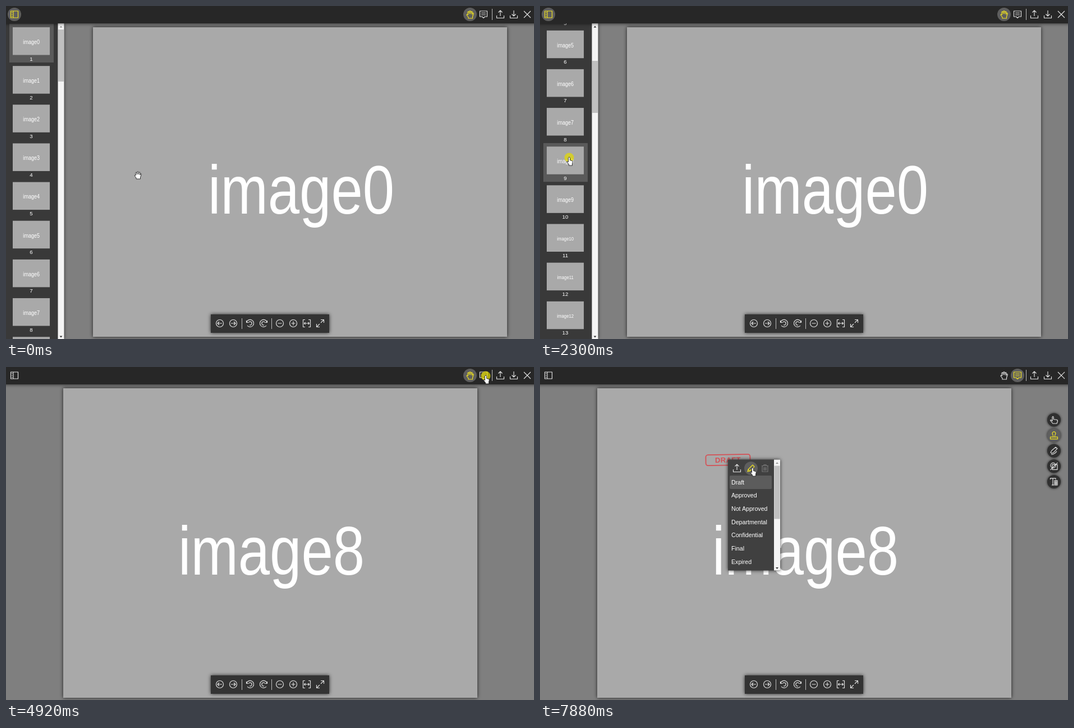
Write an HTML page that moves like this. It is 941x595 px and loops after 8 s.

```html
<!DOCTYPE html>
<html lang="en">
<head>
<meta charset="utf-8">
<title>Document viewer</title>
<style>
  html, body { margin: 0; height: 100%; overflow: hidden; background: #7f7f7f; }
  svg { display: block; width: 941px; height: 595px; font-family: "Liberation Sans", Arial, sans-serif; }
  text { fill: #fff; }
  .shadow { filter: drop-shadow(0 0 3px rgba(0, 0, 0, .75)); }
  .mid { text-anchor: middle; }
  .icon path { fill: none; stroke: #e2e2e2; stroke-width: 1.15; stroke-linejoin: round; }
  .icon circle { fill: none; }
  .tool circle { fill: #303030; filter: drop-shadow(0 0 2px rgba(0, 0, 0, .7)); }
  .icon.hot circle, .icon.on circle { fill: #5e5e5e; }
  .icon.on path { stroke: #f2e420; }
  .dim { opacity: .35; }
  .cell { fill: none; }
  .cell.lit { fill: #5a5a5a; }
  .cursor { fill: #fff; stroke: #222; stroke-width: .9; stroke-linejoin: round; }
  .hidden { display: none; }
</style>
</head>
<body>
<svg id="stage" viewBox="0 0 941 595"></svg>
<script>
const LOOP = 8000, PITCH = 69.15, CELLS = 14;

const HAND = 'M-3 7V5L-6 1Q-5.6-1-3.5.5L-4.2-4Q-3-6-1.9-4.2L-1.3-1-1-5.7Q.2-7 1.2-5.5L1.4-1 2.2-4.8Q3.5-6 4.2-4.3L3.8 0 4.8-2.4Q6.3-2.8 6.2-1L4.5 4V7Z';
const RING = 'M6.5 0A6.5 6.5 0 1 1-6.5 0A6.5 6.5 0 1 1 6.5 0';
const ICONS = {
  panel: 'M-6.5-6H6.5V6H-6.5ZM-2-6V6M-5-3.5H-3.5M-5 0H-3.5M-5 3.5H-3.5',
  hand: HAND,
  comment: 'M-6.5-6H6.5V4H2.5L0 6.5-2.5 4H-6.5ZM-4-2.5H4M-4 .7H4',
  upload: 'M-6.5 2V6.5H6.5V2M0 3V-7M-3.5-3.5L0-7 3.5-3.5',
  download: 'M-6.5 2V6.5H6.5V2M0 3V-7M-3.5-.5L0 3 3.5-.5',
  close: 'M-6-6L6 6M6-6L-6 6',
  prev: RING + 'M4 0H-4M-1-3L-4 0-1 3',
  next: RING + 'M-4 0H4M1-3L4 0 1 3',
  ccw: 'M-6.2-2A6.5 6.5 0 1 1-5 4M-6.5-5V-1.5H-3M-2.5-1.5A3 3 0 1 1-1 2.8',
  cw: 'M6.2-2A6.5 6.5 0 1 0 5 4M6.5-5V-1.5H3M2.5-1.5A3 3 0 1 0 1 2.8',
  minus: RING + 'M-3.5 0H3.5',
  plus: RING + 'M-3.5 0H3.5M0-3.5V3.5',
  fit: 'M-3-6.5H-6.5V6.5H-3M3-6.5H6.5V6.5H3M-4.5 0H4.5M-2.5-2L-4.5 0-2.5 2M2.5-2L4.5 0 2.5 2',
  expand: 'M1-6.5H6.5V-1M6.5-6.5L1-1M-1 6.5H-6.5V1M-6.5 6.5L-1 1',
  point: 'M-3 2.5V-5Q-1.8-7.5-.8-5V-1L5-.2Q7 .5 6.3 3L5 6.5H-2L-6.5 1Q-5.8-1-3 2',
  stamp: 'M-6.5 3H6.5V6.5H-6.5ZM-1.8 3Q-1 0-2.5-2A2.9 2.9 0 1 1 2.5-2Q1 0 1.8 3',
  marker: 'M-6 3L-4-.5 3-6.5 6-4-.5 3-4.5 4.5ZM-5 6.5Q1 6.5 5 1',
  shape: 'M3-1.5A4.5 4.5 0 1 1-1.5-6A4.5 4.5 0 0 1 3-1.5M-3-3H6V6H-3ZM-6.5 6.5L6.5-6.5',
  type: 'M-6.5-4V-6H3V-4M-2-6V6M-4 6H0M1-2H6V6H1ZM1 1H6M1 3.5H6M3.5-2V6',
  pencil: 'M-6 6L-5 2 3-6 6-3-2 5ZM-5 2L-2 5',
  trash: 'M-6-4.5H6M-2-4.5V-6.5H2V-4.5M-5-4.5V6H5V-4.5M-2-2V4M0-2V4M2-2V4'
};
const CURSORS = {
  grab: HAND,
  pointer: 'M-1.5.3C-1.2-1.3 1.2-1.3 1.5.3V4.5L5.3 5.6Q6.4 6 6.2 7.5L5.5 11V14H-.5V12L-3.8 8Q-4.3 6.5-3 6.5L-1.5 8Z',
  arrow: 'M0 0V13L3 10.3 5 15 7 14.2 5 9.6H9Z'
};

// Bursts of activity: start, end, number of updates
const BURSTS = [[100, 190, 2], [560, 1300, 9], [1500, 2120, 8], [2300, 3070, 9], [3150, 3160, 2],
  [3450, 4180, 9], [4280, 5020, 9], [5220, 5940, 9], [6120, 6780, 8], [6960, 7040, 2],
  [7420, 7520, 2], [7700, 7880, 3]];
const PATH = [[0, 235, 302], [100, 138, 118], [190, 100, -40], [560, 82, 6], [1115, 75, 102], [1300, 55, 224],
  [1500, 52, 260], [1588, 52, 271], [2396, 52, 271], [3070, 22, 15], [3160, 21, 14], [4000, 21, 14],
  [4180, 775, 109], [4280, 787, 92], [4650, 855, 16], [5020, 855, 16], [5220, 862, 28], [5940, 916, 125],
  [6214, 916, 125], [6308, 900, 128], [6780, 335, 165], [7040, 335, 165], [7420, 352, 185],
  [7520, 371, 201], [7700, 373, 195], [7880, 379, 181]];
const MODES = [[0, 'grab'], [560, 'arrow'], [700, 'pointer'], [4080, 'grab'], [4550, 'pointer'],
  [5220, 'arrow'], [5800, 'pointer'], [6300, 'arrow'], [7420, 'pointer']];
const SCROLL = [[1499, 0], [1500, 30], [2120, 340], [2300, 340], [2396, 305]];
const SLIDE = [[3541, 0], [3815, 83.5], [3906, 112]];
const CLICKS = [[2300, 2390], [3450, 3540], [4830, 4920], [6120, 6210], [6960, 7030]];

const icon = (name, x, y, cls = '', r = 12) =>
  `<g id="${name}" class="icon ${cls}" transform="translate(${x} ${y})"><circle r="${r}"/><path d="${ICONS[name]}"/></g>`;
const rect = (x, y, w, h, fill, extra = '') =>
  `<rect x="${x}" y="${y}" width="${w}" height="${h}" fill="${fill}" ${extra}/>`;
const rule = (x, y, h) => rect(x, y, 1, h, '#bbb');
const each = (list, make) => list.map(make).join('');

// Page artwork: the label always fills the same width
const page = label => rect(0, 0, 738, 553, '#a9a9a9') +
  `<text class="mid" transform="translate(371 ${289 + 264 / label.length}) scale(.83 1)" font-size="${732 / label.length}">${label}</text>`;

const scrollbar = (id, x, y, h, thumb) => rect(x, y, 11, h, '#f4f4f4') +
  rect(x + .5, y + 11, 10, thumb, '#c0c0c0', `id="${id}Thumb"`) +
  `<path id="${id}Up" fill="#999" d="M${x + 3} ${y + 7.5}h5l-2.5-3z"/>` +
  `<path fill="#333" d="M${x + 3} ${y + h - 5.5}h5l-2.5 3z"/>`;

const cell = i => `<g transform="translate(0 ${38 + i * PITCH})">
  <rect class="cell" x="6" y="-6.2" width="79" height="${PITCH}"/>
  <g transform="translate(12 0) scale(.0895)">${page('image' + i)}</g>
  <text class="mid" x="45" y="59.5" font-size="9.7">${i + 1}</text></g>`;

const menuItem = (label, i) => `<text x="341" y="${209.5 + i * 23.7}" font-size="10.65">${label}</text>`;

const stage = document.getElementById('stage');
stage.innerHTML = rect(0, 0, 941, 595, '#7f7f7f') +
  `<g id="page"><g class="shadow">${page('image0')}</g></g>
  <g id="sidebar">${rect(-20, 31, 123, 564, '#393939', 'class="shadow"')}
    <g id="cells">${each([...Array(CELLS).keys()], cell)}</g>${scrollbar('side', 92.5, 31, 564, 93)}</g>` +
  rect(-9, -9, 959, 40, '#272727', 'class="shadow"') +
  icon('panel', 15, 15) + icon('hand', 827, 15) + icon('comment', 851, 15) + rule(866, 5, 20) +
  icon('upload', 881, 15) + icon('download', 905, 15) + icon('close', 929, 15) +
  rect(365, 551, 211, 33, '#333', 'class="shadow"') +
  each([['prev', 381], ['next', 405], ['ccw', 435], ['cw', 459], ['minus', 488], ['plus', 512], ['fit', 536], ['expand', 560]],
    ([name, x]) => icon(name, x, 567)) + rule(420, 558, 19) + rule(473, 558, 19) +
  `<g id="tools">${each(['point', 'stamp', 'marker', 'shape', 'type'], (name, i) => icon(name, 916, 94.5 + i * 27.6, 'tool'))}</g>
  <g id="draft"><g transform="rotate(-1)" opacity=".9">
    <rect x="-39.5" y="-9.5" width="79" height="19" rx="4" fill="none" stroke="#d9484e" stroke-width="1.8"/>
    <text class="mid" y="4.6" font-size="13" font-weight="bold" letter-spacing=".4" style="fill:#d9484e">DRAFT</text></g></g>
  <g id="menu">${rect(335, 165.5, 93, 198, '#404040', 'class="shadow"')}${rect(338, 194, 75, 24, '#5c5c5c', 'rx="2"')}
    ${icon('upload', 351, 181)}${icon('pencil', 376, 181)}${icon('trash', 401, 181, 'dim')}
    ${each(['Draft', 'Approved', 'Not Approved', 'Departmental', 'Confidential', 'Final', 'Expired'], menuItem)}
    ${scrollbar('menu', 417, 165.5, 198, 95)}</g>
  <g id="mouse"><circle id="click" r="8.5" fill="#e3da00" opacity=".72"/><path id="cursor" class="cursor"/></g>`;

const el = id => document.getElementById(id);
const move = (id, x, y) => el(id).setAttribute('transform', `translate(${x} ${y})`);
const show = (id, on) => el(id).classList.toggle('hidden', !on);
const light = (id, on, cls = 'on') => el(id).classList.toggle(cls, on);
const cells = [...document.querySelectorAll('.cell')];
const bigLabel = document.querySelector('#page text');

// Time of the latest screen update
function stepped(t) {
  const burst = BURSTS.findLast(b => b[0] <= t);
  if (!burst) return 0;
  const [start, end, count] = burst, gap = (end - start) / (count - 1);
  return Math.min(end, start + Math.floor((t - start) / gap) * gap);
}

function track(keys, t) {
  const i = keys.findIndex(k => k[0] > t);
  if (i <= 0) return keys.at(i).slice(1);
  const a = keys[i - 1], b = keys[i], p = (t - a[0]) / (b[0] - a[0]);
  return a.slice(1).map((v, j) => v + (b[j + 1] - v) * p);
}

function draw() {
  const t = stepped(performance.now() % LOOP);
  const [x, y] = track(PATH, t), [scroll] = track(SCROLL, t), [slide] = track(SLIDE, t);
  const selected = t < 2390 ? 0 : 8;
  const hovered = x < 85 && y > 31 && t < 3500 ? Math.floor((y - 31.8 + scroll) / PITCH) : -1;

  bigLabel.textContent = 'image' + selected;
  move('page', t < 3540 ? 155 : 102, 38);
  move('sidebar', -slide, 0);
  move('cells', 0, -scroll);
  move('sideThumb', 0, scroll * .1647);
  el('sideUp').setAttribute('fill', scroll ? '#333' : '#999');
  cells.forEach((c, i) => c.classList.toggle('lit', i === selected || i === hovered));

  light('panel', t < 3900);
  light('hand', t < 4920);
  light('comment', t >= 4920);
  show('tools', t >= 5220);
  light('point', t < 6210);
  light('stamp', t >= 6210);
  light('stamp', t > 5800 && y > 110, 'hot');

  show('draft', t >= 6300);
  if (t < 6400) move('draft', 40, 42);
  else if (t < 6780) move('draft', x, y + 1);
  else move('draft', 335, 166);
  show('menu', t >= 7030);
  light('pencil', t >= 7780);

  move('mouse', x, y);
  el('cursor').setAttribute('d', CURSORS[MODES.findLast(m => m[0] <= t)[1]]);
  show('click', CLICKS.some(([from, to]) => t >= from && t < to));
  requestAnimationFrame(draw);
}
draw();
</script>
</body>
</html>
```
